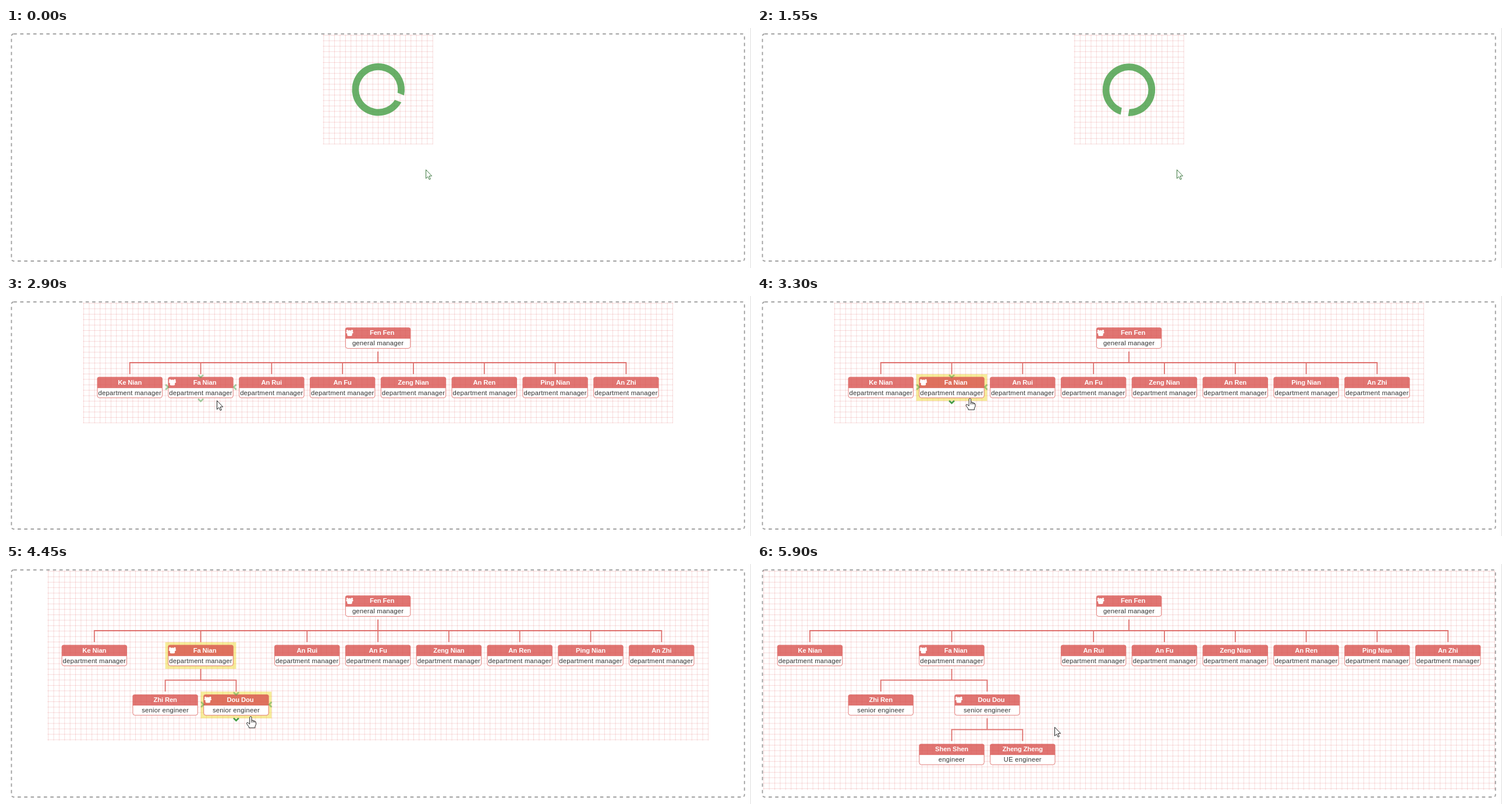
An HTML page with a canvas that plays this animation: 1280x414 px, repeating every 7.05 s.

```html
<!DOCTYPE html>
<html lang="en">
<head>
<meta charset="utf-8">
<title>Org chart</title>
<style>
  html, body { margin: 0; width: 100%; height: 100%; overflow: hidden; background: #fff; }
  canvas { display: block; width: 1280px; height: 414px; }
</style>
</head>
<body>
<canvas id="stage" width="1280" height="414"></canvas>
<script>
const ctx = document.getElementById('stage').getContext('2d');
const LOOP = 7050, STEP = 50;
// The page is laid out 1366 units wide and shown on 1280 pixels
const SCALE = 1280 / 1366, COL = 130 * SCALE, ROW = 91 * SCALE;
const MID = 682 * SCALE, TOP = 12 * SCALE, CARD_TOP = 58 * SCALE;
const CARD_W = 120 * SCALE, TITLE_H = 20 * SCALE, CARD_H = 39 * SCALE;
const RED = 'rgba(217,83,79,0.8)', GREEN = '#449d44';
const FONT = '11.25px "Liberation Sans", Arial, sans-serif';

const card = (name, role, kids) => ({ name, role, kids });
const dept = (name, kids) => card(name, 'department manager', kids);
const lead = card('Dou Dou', 'senior engineer', [
  card('Shen Shen', 'engineer'),
  card('Zheng Zheng', 'UE engineer')
]);
const boss = dept('Fa Nian', [card('Zhi Ren', 'senior engineer'), lead]);
const root = card('Fen Fen', 'general manager', [
  dept('Ke Nian'), boss, dept('An Rui'), dept('An Fu'),
  dept('Zeng Nian'), dept('An Ren'), dept('Ping Nian'), dept('An Zhi')
]);

const clamp = v => Math.max(0, Math.min(1, v));
const ramp = (t, a, b) => clamp((t - a) / (b - a));
const ease = p => p * p * (3 - 2 * p);
const mix = (a, b, p) => a + (b - a) * p;

// Pointer path: start, end, from, to
const moves = [
  [2050, 2800, [721, 244], [364, 184]],
  [2800, 2900, [364, 184], [362, 180]],
  [2900, 3300, [362, 180], [366, 176.5]],
  [3600, 4400, [366, 176.5], [420.5, 263]],
  [5100, 5500, [420.5, 263], [511, 281]]
];

function pointerAt(t) {
  let pos = moves[0][2];
  for (const [a, b, from, to] of moves) {
    if (t < a) break;
    const p = ease(ramp(t, a, b));
    pos = [mix(from[0], to[0], p), mix(from[1], to[1], p)];
  }
  return pos;
}

function poly(points, close) {
  ctx.beginPath();
  points.forEach(([x, y]) => ctx.lineTo(x, y));
  if (close) ctx.closePath();
}

function drawFrame() {
  ctx.fillStyle = '#fff';
  ctx.fillRect(0, 0, 1280, 414);
  ctx.fillStyle = '#ddd';
  ctx.fillRect(1279, 0, 1, 414);
  // Dashes run along the outer edge; the outer half of the stroke is clipped
  ctx.save();
  ctx.scale(SCALE, SCALE);
  ctx.beginPath();
  ctx.roundRect(9, 10, 1346, 420, 5);
  ctx.clip();
  ctx.strokeStyle = '#a0a0a0';
  ctx.lineWidth = 4;
  ctx.setLineDash([6, 6]);
  ctx.stroke();
  ctx.restore();
}

function drawGrid(w, h) {
  const left = MID - w / 2, gap = 10 * SCALE;
  ctx.fillStyle = 'rgba(200,0,0,0.15)';
  for (let x = SCALE; x < w - 0.1; x += gap) ctx.fillRect(left + x, TOP, SCALE, h);
  for (let y = SCALE; y < h - 0.1; y += gap) ctx.fillRect(left, TOP + y, w, SCALE);
}

function drawSpinner(t) {
  const deg = t < 850 ? mix(21, 277, t / 850) : mix(277, 460, (t - 850) / 700);
  const outer = 45.3, inner = 33.5, half = 6.5;
  const a = Math.asin(half / outer), b = Math.asin(half / inner);
  ctx.save();
  ctx.translate(MID, 105.9);
  ctx.rotate(deg * Math.PI / 180);
  ctx.beginPath();
  ctx.arc(0.7, 0, outer, a, 2 * Math.PI - a);
  ctx.arc(0.7, 0, inner, 2 * Math.PI - b, b, true);
  ctx.closePath();
  ctx.fillStyle = 'rgba(68,157,68,0.8)';
  ctx.fill();
  ctx.restore();
}

function drawTeamIcon(x, y) {
  ctx.fillStyle = '#fff';
  const person = (cx, cy, r, w, h) => {
    ctx.beginPath();
    ctx.arc(cx, cy, r, 0, 7);
    ctx.fill();
    ctx.beginPath();
    ctx.roundRect(cx - w / 2, cy + r * 0.6, w, h, 1.8);
    ctx.fill();
  };
  person(x - 4, y - 3.6, 1.8, 4.4, 3.6);
  person(x + 4, y - 3.6, 1.8, 4.4, 3.6);
  person(x, y - 1.8, 2.8, 8.4, 5.4);
}

function drawChevron(x, y, turn, color) {
  ctx.save();
  ctx.translate(x, y);
  ctx.rotate(turn * Math.PI / 2);
  poly([[-4.4, -2.2], [0, 2], [4.4, -2.2]]);
  ctx.strokeStyle = color;
  ctx.lineWidth = 2.7;
  ctx.stroke();
  ctx.restore();
}

function drawLabel(text, x, y, color, weight, spacing) {
  ctx.font = weight + ' ' + FONT;
  ctx.letterSpacing = spacing + 'px';
  ctx.fillStyle = color;
  ctx.fillText(text, x, y);
}

function drawCard(node, x, y, glow) {
  const left = x - CARD_W / 2;
  if (glow > 0) {
    ctx.fillStyle = `rgba(238,217,54,${0.5 * glow})`;
    ctx.fillRect(x - COL / 2, y - 4.7, COL, 46);
  }
  ctx.fillStyle = RED;
  ctx.beginPath();
  ctx.roundRect(left, y, CARD_W, TITLE_H, [3.75, 3.75, 0, 0]);
  ctx.fill();

  ctx.beginPath();
  ctx.roundRect(left + 0.5, y + TITLE_H, CARD_W - 1, CARD_H - TITLE_H - 0.5, [0, 0, 3.75, 3.75]);
  ctx.fillStyle = '#fff';
  ctx.fill();
  ctx.strokeStyle = RED;
  ctx.lineWidth = SCALE;
  ctx.stroke();

  if (node.kids) drawTeamIcon(left + 7.6, y + 9.3);
  drawLabel(node.name, x + (node.kids ? 7 : 0), y + 13.1, '#fff', 'bold', -0.12);
  drawLabel(node.role, x, y + 31, '#333', 'normal', 0.22);
}

function drawEdges(x, y, hot, open) {
  const pale = 'rgba(68,157,68,0.5)', mid = y + 17.5;
  drawChevron(x, y - 1.3, 0, pale);
  drawChevron(x - 58, mid, -1, pale);
  drawChevron(x + 58.8, mid, 1, pale);
  const shift = !hot ? 40 : open ? 38.6 : 43.2;
  drawChevron(x, y + shift, open ? 2 : 0, hot ? GREEN : pale);
}

function sceneAt(t) {
  const bossGlow = t < 4800 ? ramp(t, 2900, 3100) : 1 - ramp(t, 4750, 5000);
  const leadGlow = t < 5900 ? ramp(t, 4250, 4450) : 0;
  const open = new Set([root]);
  if (t >= 3650) open.add(boss);
  if (t >= 4800) open.add(lead);
  let hover = null;
  if (t >= 2900 && t < 3800) hover = boss;
  if (t >= 4250 && t < 5200) hover = lead;
  const hand = (t >= 3250 && t < 3700) || (t >= 4400 && t < 5150);
  return { open, hover, hand, glow: new Map([[boss, bossGlow], [lead, leadGlow]]) };
}

function drawTree(scene) {
  const kidsOf = n => scene.open.has(n) ? n.kids : [];
  const span = n => Math.max(1, kidsOf(n).reduce((s, k) => s + span(k), 0));
  const depth = n => 1 + Math.max(0, ...kidsOf(n).map(depth));
  const cols = span(root), levels = depth(root);
  drawGrid(cols * COL + 42 * SCALE, 222 * SCALE + ROW * (levels - 2));

  let edges = null;
  const place = (node, left, level) => {
    const x = left + span(node) * COL / 2;
    const y = CARD_TOP + level * ROW;
    const kids = kidsOf(node);
    drawCard(node, x, y, scene.glow.get(node) || 0);
    if (scene.hover === node) edges = [x, y];
    if (kids.length) {
      let next = left;
      const xs = kids.map(k => {
        const kx = place(k, next, level + 1);
        next += span(k) * COL;
        return kx;
      });
      const bar = y + 60.7;
      ctx.beginPath();
      ctx.moveTo(x, y + 41.3);
      ctx.lineTo(x, bar);
      ctx.moveTo(xs[0], y + 80.5);
      ctx.lineTo(xs[0], bar);
      ctx.lineTo(xs[xs.length - 1], bar);
      ctx.lineTo(xs[xs.length - 1], y + 80.5);
      xs.slice(1, -1).forEach(kx => {
        ctx.moveTo(kx, bar);
        ctx.lineTo(kx, y + 80.5);
      });
      ctx.strokeStyle = RED;
      ctx.lineWidth = 2 * SCALE;
      ctx.stroke();
    }
    return x;
  };
  place(root, MID - cols * COL / 2, 0);
  if (edges) drawEdges(...edges, scene.hand, scene.open.has(scene.hover));
}

const ARROW = [[0.5, 0.5], [0.5, 15.6], [3.8, 12.4], [6.2, 17.4], [8.3, 16.5], [6, 11.4], [10.6, 11.2]];
const HAND = [[-1.8, 1.2], [-0.8, 0.3], [0.6, 0.3], [1.5, 1.2], [1.5, 6.3], [4, 6.8], [4.6, 7.6],
  [6.6, 7.9], [7.2, 8.9], [8.6, 9.3], [9, 10.4], [9, 13.8], [7.4, 17.2], [7.4, 19.7],
  [-3, 19.7], [-3.2, 17.8], [-6.8, 12.8], [-6.6, 10.8], [-4.9, 10.5], [-1.8, 13.2]];

function drawPointer(t, hand) {
  const [x, y] = pointerAt(t);
  ctx.save();
  ctx.translate(x, y);
  poly(hand ? HAND : ARROW, true);
  ctx.fillStyle = '#fff';
  ctx.fill();
  ctx.strokeStyle = t < 2100 ? '#3d7840' : '#222';
  ctx.lineWidth = 1;
  ctx.lineJoin = 'round';
  ctx.stroke();
  if (hand) {
    ctx.beginPath();
    [1.5, 4.2, 6.8].forEach((fx, i) => {
      ctx.moveTo(fx, 6.5 + i * 0.6);
      ctx.lineTo(fx, 10.5);
    });
    ctx.stroke();
  }
  ctx.restore();
}

function draw(now) {
  const t = Math.floor(now % LOOP / STEP) * STEP;
  const scene = sceneAt(t);
  ctx.textAlign = 'center';
  drawFrame();
  if (t < 1600) {
    drawGrid(202 * SCALE, 202 * SCALE);
    drawSpinner(t);
  } else {
    drawTree(scene);
  }
  drawPointer(t, scene.hand);
}

const start = performance.now();
function tick() {
  draw(performance.now() - start);
  requestAnimationFrame(tick);
}
tick();
</script>
</body>
</html>
```
